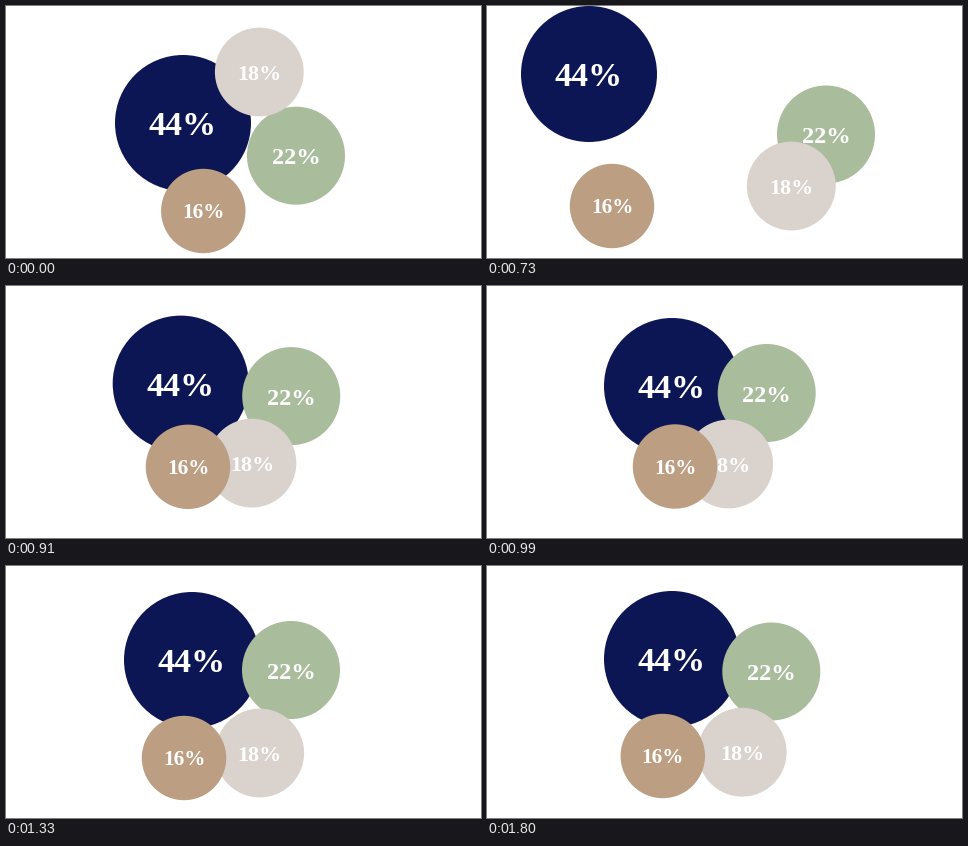
Write a matplotlib script that moves like this. It is 475 px wide and 252 px high and loops after 1820 ms.

```python
import numpy as np
import matplotlib.pyplot as plt
from matplotlib.animation import FuncAnimation
from matplotlib.patches import Circle

W, H, DPI = 475, 252, 100
LEFT, RIGHT = 8, 424          # visible part of the stage
TICK, LOOP = 10, 1820         # ms
HOLD, STEP, PAUSE = 610, 20, 1400

# Simulation steps at which the bubble positions are pinned
KEYS = np.array([0, 6, 11, 19, 27, 36, 59], float)

# label, radius, colour, resting place, path through KEYS (bottom to top)
BUBBLES = [
    ("44%", 68, "#0c1654", (177, 117),
     [(41.5, 40), (102, 68), (150.3, 89), (185, 100),
      (186.5, 95.5), (186, 94), (185, 93)]),
    ("22%", 49, "#a9bc9c", (290, 149.7),
     [(385, 147.5), (339, 128.5), (302, 115.7), (279.7, 107),
      (284, 103.7), (285, 104), (284.3, 105.5)]),
    ("18%", 44.4, "#dad2cd", (253.3, 66),
     [(361.4, 180.6), (304.3, 180), (262.4, 177), (241.7, 178),
      (251.5, 185.5), (253.7, 187), (255.2, 186.2)]),
    ("16%", 42.2, "#bc9e82", (197.3, 205),
     [(75.4, 224), (125, 200), (164, 183), (188, 180.5),
      (180.5, 190.5), (178, 192), (175.8, 190)]),
]


def tangents(y):
    """Slopes at the keys, limited so the curve never overshoots."""
    h = np.diff(KEYS)
    d = np.diff(y) / h
    a, b = d[:-1], d[1:]
    mean = (h[1:] * a + h[:-1] * b) / (h[1:] + h[:-1])
    cap = 3 * np.minimum(abs(a), abs(b))
    inner = np.where(a * b > 0, np.clip(mean, -cap, cap), 0)
    return np.concatenate(([d[0]], inner, [0]))


def hermite(y, m, k):
    i = min(np.searchsorted(KEYS, k, side="right") - 1, len(KEYS) - 2)
    h = KEYS[i + 1] - KEYS[i]
    s = (k - KEYS[i]) / h
    return ((1 + 2 * s) * (1 - s) ** 2 * y[i] + s * (1 - s) ** 2 * h * m[i]
            + s * s * (3 - 2 * s) * y[i + 1] + s * s * (s - 1) * h * m[i + 1])


class Bubble:
    def __init__(self, ax, z, label, r, color, rest, path):
        self.r, self.rest = r, rest
        self.curves = [(y, tangents(y)) for y in np.array(path, float).T]
        self.disc = ax.add_patch(Circle(rest, r, fc=color, lw=0, zorder=z))
        self.text = ax.text(0, 0, label, color="white", weight="bold",
                            family="Liberation Serif",
                            size=r / 2 * 72 / DPI, ha="center",
                            va="baseline", clip_on=True, zorder=z + 0.5)

    def place(self, k):
        if k < 0:
            x, y = self.rest
        else:
            x, y = (hermite(v, m, k) for v, m in self.curves)
        self.disc.center = x, y
        self.text.set_position((x, y + 0.175 * self.r))


fig = plt.figure(figsize=(W / DPI, H / DPI), dpi=DPI, facecolor="white")
ax = fig.add_axes([LEFT / W, 0, (RIGHT - LEFT) / W, 1])
ax.set(xlim=(LEFT, RIGHT), ylim=(H, 0))
ax.axis("off")

bubbles = [Bubble(ax, z, *spec) for z, spec in enumerate(BUBBLES, 1)]


def draw(n):
    t = n * TICK
    if t >= PAUSE:
        t -= TICK             # one step lasts a tick longer
    k = (t - HOLD) // STEP
    for b in bubbles:
        b.place(k)
    return []


anim = FuncAnimation(fig, draw, frames=LOOP // TICK, interval=TICK,
                     init_func=lambda: draw(0), repeat=True, repeat_delay=0)
plt.show()
```
